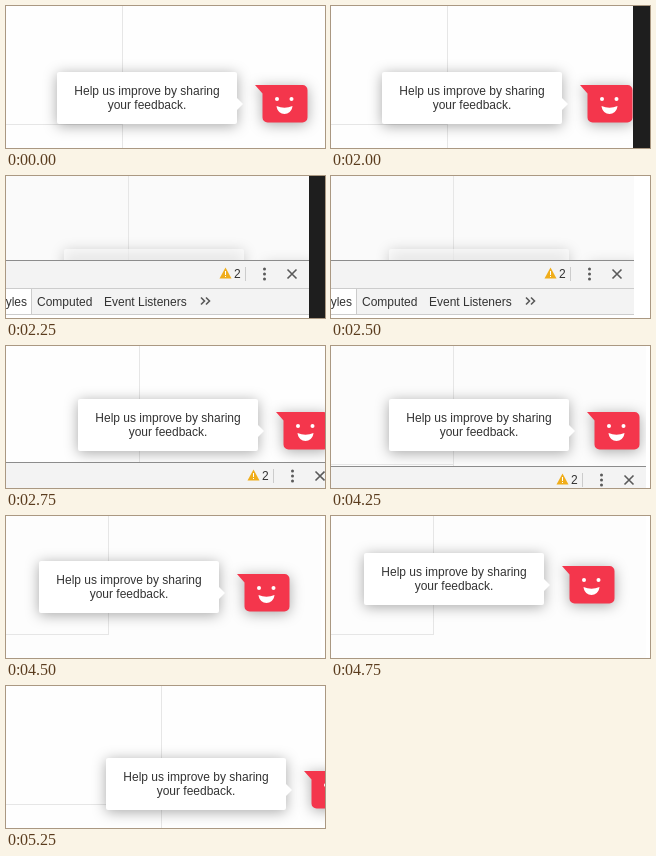
These frames come from a looping animation (319 by 142 pixels, 6250 ms). An HTML page with a canvas:

```html
<!DOCTYPE html>
<html lang="en">
<head>
<meta charset="utf-8">
<title>Feedback widget while resizing</title>
<style>
html, body { margin: 0; width: 100%; height: 100%; overflow: hidden; background: #fff; }
canvas { display: block; width: 100vw; height: 100vh; }
</style>
</head>
<body>
<canvas id="stage" width="319" height="142"></canvas>
<script>
const W = 319, H = 142, LOOP = 6250;
const ctx = document.getElementById('stage').getContext('2d');

// x, y: top left of the bubble; line: page guide; panel: top of the tool panel;
// right: right edge of the window; strip: dark desktop beside the window.
const scenes = [
  { at: 0, x: 51, y: 66, line: 116 },
  { at: 2000, x: 51, y: 66, line: 116, strip: 302 },
  { at: 2250, x: 58, y: 73, line: 122, panel: 84, right: 303, strip: 303, page: '#fafafa', opacity: 0.6 },
  { at: 2500, x: 58, y: 73, line: 122, panel: 84, right: 303, page: '#fafafa', opacity: 0.6 },
  { at: 2750, x: 72, y: 53, line: 133, panel: 116, right: 331 },
  { at: 3750, x: 72, y: 53, line: 133, panel: 136, right: 331 },
  { at: 4000, x: 65, y: 53, line: 128, panel: 128, right: 323 },
  { at: 4250, x: 58, y: 53, line: 122, panel: 120, right: 315, page: '#fcfcfc' },
  { at: 4500, x: 33, y: 45, line: 102, lineEnd: 119, right: 315, page: '#fdfdfd' },
  { at: 4750, x: 33, y: 37, line: 102, lineEnd: 119, right: 315, page: '#fdfdfd' },
  { at: 5000, x: 100, y: 72, line: 155 }
];

function box(x, y, w, h, color) {
  ctx.fillStyle = color;
  ctx.fillRect(x, y, w, h);
}

function shape(color, build) {
  ctx.fillStyle = color;
  ctx.beginPath();
  build();
  ctx.fill();
}

function polygon(...points) {
  points.forEach(([x, y], i) => i ? ctx.lineTo(x, y) : ctx.moveTo(x, y));
  ctx.closePath();
}

function label(text, x, y, align = 'left') {
  ctx.font = '12px "Liberation Sans", Arial, sans-serif';
  ctx.textAlign = align;
  ctx.fillStyle = '#333';
  ctx.fillText(text, x, y);
}

function withShadow(draw) {
  ctx.save();
  ctx.shadowColor = 'rgba(0,0,0,.34)';
  ctx.shadowBlur = 14;
  ctx.shadowOffsetY = 2;
  draw();
  ctx.restore();
}

function drawBubble() {
  withShadow(() => shape('#fff', () => ctx.roundRect(0, 0, 180, 52, 2)));
  shape('#fff', () => polygon([180, 26], [186, 32], [180, 38]));
  label('Help us improve by sharing', 90, 23, 'center');
  label('your feedback.', 90, 37, 'center');
}

function drawSmiley() {
  withShadow(() => shape('#f4364c', () => {
    ctx.roundRect(205.5, 13, 45, 37.5, 5);
    polygon([198, 13], [212, 13], [212, 28], [205.5, 21.5]);
  }));
  for (const x of [220, 234.5]) shape('#fff', () => ctx.arc(x, 27, 2, 0, 7));
  shape('#fff', () => {
    ctx.moveTo(219.5, 34);
    ctx.quadraticCurveTo(227.5, 37.5, 235.5, 34);
    ctx.bezierCurveTo(234.5, 44.5, 220.5, 44.5, 219.5, 34);
  });
}

function drawPanel(top, right) {
  ctx.save();
  ctx.translate(0, top);
  box(0, 0, right, 54, '#f3f3f3');
  box(0, 0, right, 1, '#8c8c8c');
  box(0, 28, right, 1, '#ccc');
  box(0, 29, 25, 25, '#fff');
  box(25, 29, 1, 25, '#ccc');
  box(0, 54, right, 1, '#ccc');
  box(0, 55, right, H, '#fff');

  label('Styles', 21, 46, 'right');
  label('Computed', 31, 46);
  label('Event Listeners', 98, 46);
  ctx.strokeStyle = '#5a5a5a';
  ctx.lineWidth = 1.6;
  ctx.beginPath();
  for (const x of [195, 200]) {
    ctx.moveTo(x, 37.5);
    ctx.lineTo(x + 3.5, 41);
    ctx.lineTo(x, 44.5);
  }

  ctx.translate(right - 1, 0);
  ctx.moveTo(-20.5, 9.5);
  ctx.lineTo(-11.5, 18.5);
  ctx.moveTo(-11.5, 9.5);
  ctx.lineTo(-20.5, 18.5);
  ctx.stroke();
  shape('#f0ad1a', () => polygon([-82.5, 7.5], [-76.5, 18.5], [-88.5, 18.5]));
  box(-83, 11, 1, 4, '#fff');
  box(-83, 16, 1, 1, '#fff');
  label('2', -74, 18);
  box(-63, 7, 1, 14, '#ccc');
  for (const y of [9, 14, 19]) shape('#5a5a5a', () => ctx.arc(-43.5, y, 1.5, 0, 7));
  ctx.restore();
}

function drawScene({ x, y, line, lineEnd = H, panel, right = W, strip, page = '#fefefe', opacity = 1 }) {
  box(0, 0, W, H, '#fff');
  ctx.save();
  ctx.beginPath();
  ctx.rect(0, 0, right, H);
  ctx.clip();
  box(0, 0, W, H, page);
  box(line, 0, 1, lineEnd, '#e6e6e6');
  box(0, 118, line, 1, '#e6e6e6');
  ctx.save();
  ctx.globalAlpha = opacity;
  ctx.translate(x, y);
  drawSmiley();
  drawBubble();
  ctx.restore();
  if (panel) drawPanel(panel, right);
  ctx.restore();
  if (strip) box(strip, 0, W - strip, H, '#1e1e1e');
}

const start = performance.now();
function tick() {
  const time = (performance.now() - start) % LOOP;
  drawScene(scenes.findLast(scene => scene.at <= time));
  requestAnimationFrame(tick);
}
tick();
</script>
</body>
</html>
```
